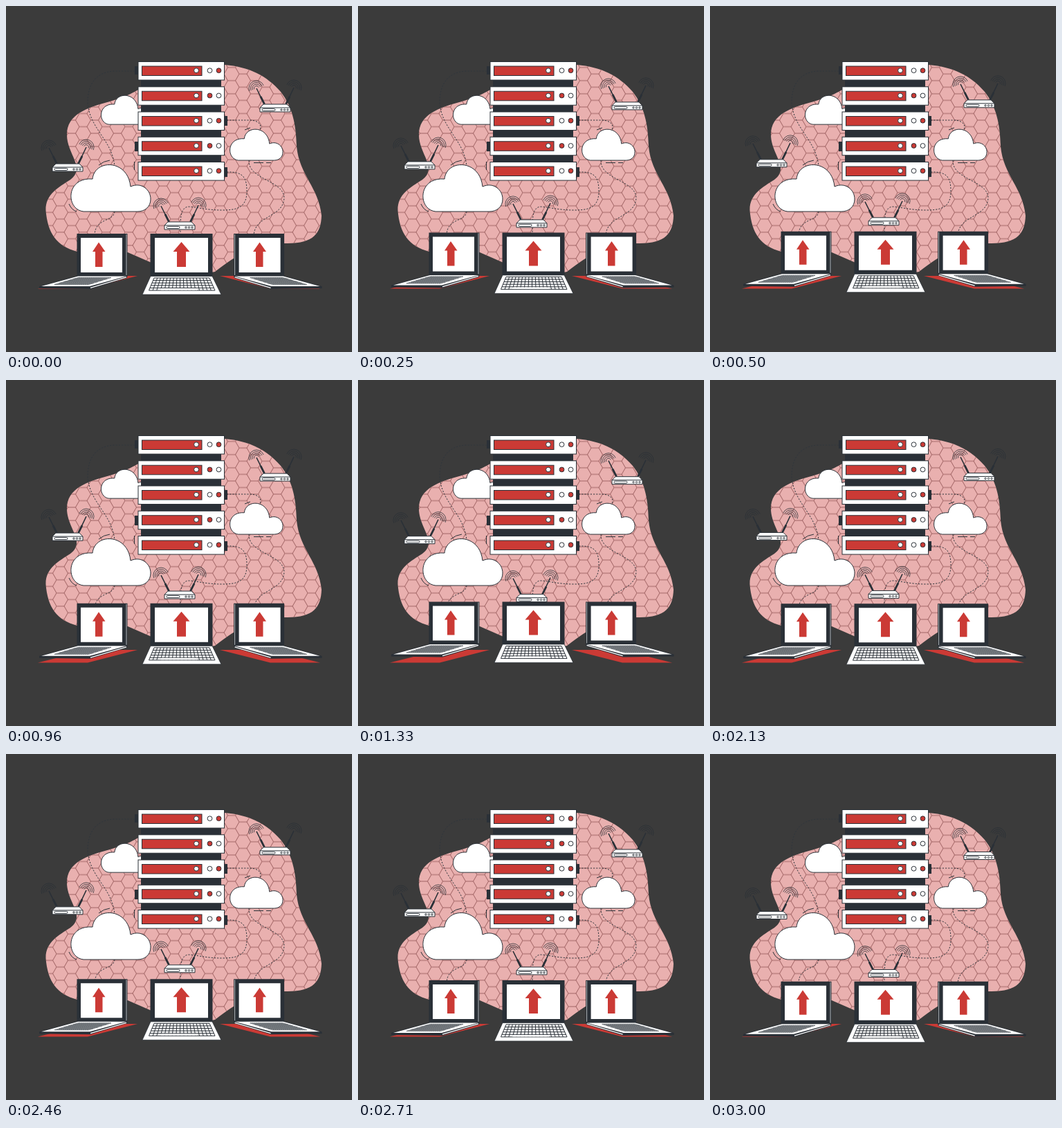
These frames come from a looping animation (500 by 500 pixels, 3040 ms). An HTML page:

```html
<!DOCTYPE html>
<html>
<head>
<meta charset="utf-8">
<style>
html, body { margin: 0; width: 100%; height: 100%; overflow: hidden; background: #3b3b3b; }
svg { display: block; width: 100vw; height: 100vh; }
.ink { fill: #2a3037; }
.white { fill: #fff; stroke: #2a3037; }
.red { fill: #cb3a35; }
.line { fill: none; stroke: #2a3037; }
.wire { fill: none; stroke: #30363c; stroke-dasharray: 2.2 2; }
</style>
</head>
<body>
<svg viewBox="0 0 500 500">
  <defs>
    <pattern id="hex" x="7" y="3" width="33" height="19.05" patternUnits="userSpaceOnUse">
      <path d="M0 0H11L16.5 9.525L11 19.05H0M16.5 9.525H27.5L33 0M27.5 9.525L33 19.05" fill="none" stroke="#8c4d4e" stroke-width=".8"/>
    </pattern>
    <path id="blob" d="M316 85C352 88 377 101 397 124C414 146 419 170 420 203C424 245 452 262 456 303C455 329 444 344 403 343C363 342 337 357 302 384C270 390 235 382 208 370L176 356C150 358 125 361 103 355C73 347 60 328 57.500 295C57 272 76 262 93 251C116 234 88 214 88 186C88 157 116 147 150 138C170 132 181 127 191 121C230 98 260 79 316 85Z"/>
    <path id="cloud" class="white" vector-effect="non-scaling-stroke" d="M112 297C86 294 86 247 125 250C128 221 176 221 180 261C195 254 209 265 209 279C209 290 201 297 190 297Z"/>
    <g id="router">
      <path class="line" d="M6-1L-5-23M38-1L49-24" stroke-width="1.500"/>
      <path class="line" d="M6.500 0L1-11M37.500 0L43-11" stroke-width="2.800"/>
      <g id="waves" class="line" stroke-width=".7"></g>
      <path class="white" d="M5 0H39L44 5V11H0V5Z"/>
      <path class="line" d="M0 5H44"/>
      <rect class="white" x="3" y="6.500" width="19" height="3" rx="1.500" stroke-width=".9"/>
      <g class="white" stroke-width=".9">
        <circle cx="31" cy="8" r="1.200"/><circle cx="35.500" cy="8" r="1.200"/><circle cx="40" cy="8" r="1.200"/>
      </g>
    </g>
    <g id="side">
      <path class="ink" d="M102.500 329H175.500V391H102.500Z"/>
      <path d="M174 330V389" stroke="#d5d8da" stroke-width=".8"/>
      <path fill="#fff" d="M108 335H168V385H108Z"/>
      <path class="ink" d="M48 405L103 390H175V393L122 409L48 408Z"/>
      <path fill="#fff" d="M104 390.500H174L121 405H51Z"/>
      <path d="M174 392L122 407.300" stroke="#fff" stroke-width="1.300"/>
      <path id="sideKeys" class="line" stroke-width=".55"/>
    </g>
  </defs>

  <use href="#blob" fill="#e9b0af"/>
  <use href="#blob" fill="url(#hex)"/>

  <path class="wire" d="M186 94H158C127 95 118 116 118 140C121 178 154 194 157 232M157 297C156 312 128 306 128 332"/>
  <path class="wire" d="M319 165H352C368 165 373 176 362 184M351 223C350 251 401 252 402 277C401 306 359 302 358 332"/>
  <path class="wire" d="M319 240C343 239 348 248 348 268C348 293 331 295 312 295C288 295 275 290 263 290C251 292 252 310 252 332"/>
  <path class="line" d="M185.500 225V237M91 286Q95 295 102 297M134 230Q141 224 150 223M345 179L353 176M358 226.500H372M376 226.500H383"/>

  <use href="#cloud" transform="translate(79.300 -13) scale(.62)"/>
  <use href="#cloud"/>
  <use href="#cloud" transform="translate(261.300 25.800) scale(.664)"/>

  <path class="ink" d="M195 100H311V230H195ZM186 87H192V99H186ZM315 159H320V173H315ZM186 196H192V210H186ZM315 233H320V247H315Z"/>
  <g id="servers"></g>

  <g id="routers">
    <use href="#router" x="67" y="228"/>
    <use href="#router" x="229" y="312"/>
    <use href="#router" x="367" y="142"/>
  </g>

  <path class="red" d="M46 408.500H118L190 390H120ZM454 408.500H382L309 390H380Z"/>
  <g id="laptops">
    <use href="#side"/>
    <use href="#side" transform="translate(504.600 0) scale(-1 1)"/>
    <path class="ink" d="M208.500 329H298.500V391H208.500Z"/>
    <path fill="#fff" d="M215 335H292V385H215Z"/>
    <path class="white" d="M209 390.500H298L311 417H197Z" stroke-width=".8"/>
    <path id="keys" class="line" stroke-width="1"/>
    <path fill="#fff" d="M223.500 408H275.500L276 410.500H222.500Z"/>
    <path class="red" d="M134 341.500L143.500 355H139.500V377H129V355H125ZM253.500 341L265.500 355H260V377H247V355H241.500ZM366.500 341.500L376 355H371.500V377H361V355H357Z"/>
  </g>
</svg>
<script>
const LOOP = 3040;
const $ = id => document.getElementById(id);
const mix = (a, b, t) => a + (b - a) * t;

// Key grid on a trapezoid with horizontal top and bottom edges
function grid(top, bottom, y0, y1, cols, rows) {
  let d = '';
  for (let i = 0; i <= cols; i++)
    d += `M${mix(...top, i / cols)} ${y0}L${mix(...bottom, i / cols)} ${y1}`;
  for (let j = 0; j <= rows; j++) {
    const t = j / rows;
    d += `M${mix(top[0], bottom[0], t)} ${mix(y0, y1, t)}H${mix(top[1], bottom[1], t)}`;
  }
  return d;
}
$('keys').setAttribute('d', grid([214, 294], [206.5, 302], 393, 411, 17, 5));
$('sideKeys').setAttribute('d', grid([104, 152], [70, 120], 392.5, 402.5, 17, 5));

const arc = (x, y, r, tilt) =>
  `<path d="M${-r} 0A${r} ${r} 0 0 1 ${r} 0" transform="translate(${x} ${y}) rotate(${tilt})"/>`;
$('waves').innerHTML = [3.5, 6, 8.5, 11]
  .map(r => arc(-5, -23, r, -22) + arc(49, -24, r, 22)).join('');

const dot = (x, y, red) =>
  `<circle cx="${x}" cy="${y}" r="3.400" class="white" ${red ? 'style="fill:#cb3a35"' : ''}/>`;
let racks = '';
for (let i = 0; i < 5; i++) {
  const y = 80.5 + i * 36.25;
  racks += `<rect class="white" x="191" y="${y}" width="124.500" height="26.500"/>
    <rect class="red" x="196.500" y="${y + 6.5}" width="86.500" height="13.500" stroke="#2a3037"/>` +
    dot(275, y + 12.7) + dot(294.5, y + 12.7, i % 2) + dot(307.5, y + 12.7, i % 2 === 0);
}
$('servers').innerHTML = racks;

// Linear rise and fall between 0 and 1
const bounce = (t, period) => 1 - Math.abs(1 - 2 * (t % period) / period);
const lift = (id, y) => $(id).setAttribute('transform', `translate(0 ${-y})`);

function draw() {
  const t = performance.now() % LOOP;
  lift('laptops', 9.8 * bounce(t, LOOP));
  lift('routers', 9.4 * bounce(t, LOOP / 2));
  requestAnimationFrame(draw);
}
draw();
</script>
</body>
</html>
```
